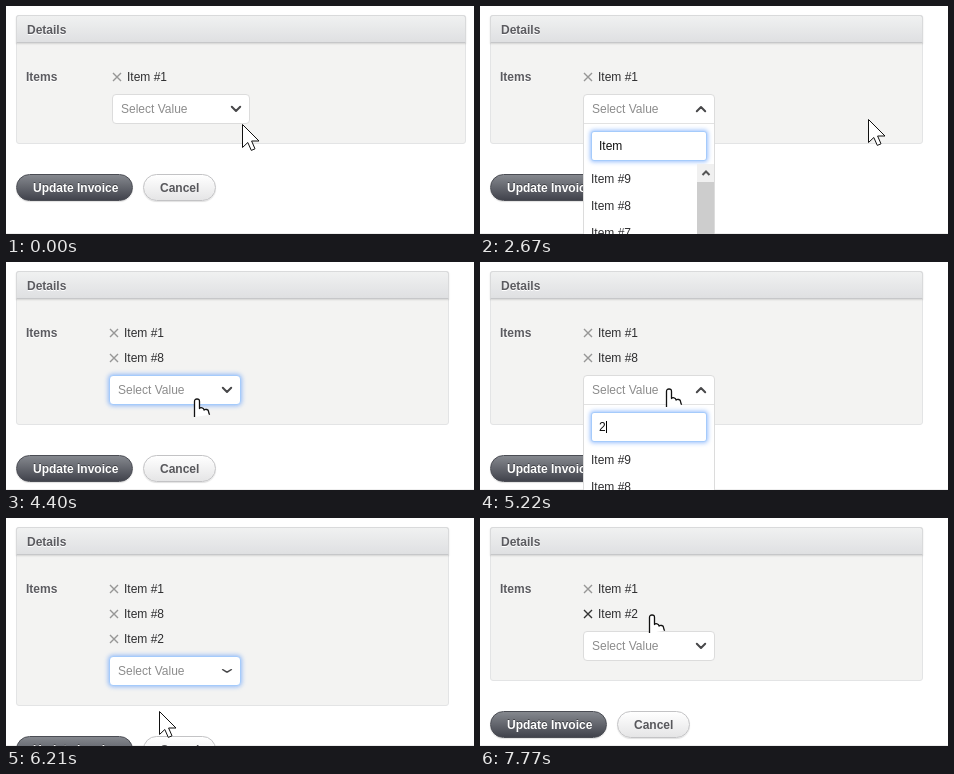
An HTML page for the animation above (7850 ms loop, 468 by 228 pixels).

```html
<!DOCTYPE html>
<html lang="en">
<head>
<meta charset="utf-8">
<title>Invoice items</title>
<style>
html, body { margin: 0; width: 100%; height: 100%; overflow: hidden; background: #fff; }
#stage {
  position: relative; width: 468px; height: 228px; overflow: hidden; background: #fff;
  font: 12px/14px "Liberation Sans", Arial, sans-serif; color: #2e2e30;
}
#stage div, #stage svg { position: absolute; box-sizing: border-box; white-space: pre; }
svg { overflow: visible; }
.rule { left: 0; top: 227px; width: 468px; height: 1px; background: #eee; }
.panel { left: 10px; top: 9px; background: #f3f3f2; border: 1px solid #e3e4e5; border-radius: 3px; }
.head {
  left: 10px; top: 9px; height: 28px; border: 1px solid #d9dadb; border-bottom-color: #c6c7c9;
  background: linear-gradient(#f0f1f1, #dfe0e2); border-radius: 3px 3px 0 0;
  box-shadow: 0 1px 2px rgba(0, 0, 0, .13);
}
.bold { font-weight: bold; color: #5b5b60; text-shadow: 0 1px #fff; }
.button {
  height: 27px; padding: 6px 0 0 16px; border: 1px solid #c3c3c5; border-radius: 14px;
  font-weight: bold; color: #58585c; background: linear-gradient(#fff, #e5e5e6);
  box-shadow: 0 1px 1px rgba(0, 0, 0, .12);
}
.dark {
  color: #fff; border-color: #4b4d54; background: linear-gradient(#85888e, #41434c);
  text-shadow: 0 -1px rgba(0, 0, 0, .4);
}
.select { background: #fff; border: 1px solid #dcdcdc; border-radius: 4px; overflow: hidden; }
.search { height: 30px; background: #fff; border: 1px solid; border-radius: 3px; }
.glow { border-color: #a5cbfb; box-shadow: 0 0 4px 1px rgba(88, 151, 251, .6); }
.divider { height: 1px; background: #e2e2e2; }
.option { height: 27px; padding: 6px 0 0 7px; }
.option.on { background: #5897fb; color: #fff; }
.caret { width: 1px; height: 12px; background: #000; }
.bar { width: 17px; height: 80px; background: #f0f0f0; }
.thumb { left: 0; top: 18px; width: 17px; height: 62px; background: #cdcdcd; }
</style>
</head>
<body>
<div id="stage"></div>
<script>
const LOOP = 7850, FRAME = 80, KEY_GAP = 90, BLINK = 500, FLIP = 200, ROW = 25, OPTION = 27;

// Each event changes part of the state
const EVENTS = [
  { at: 0, items: [1], results: [9], typing: "", open: false, wide: true, focus: false },
  { at: 410, open: true, focus: true },
  { at: 1740, typing: "Item" },
  { at: 1910, results: [9, 8, 7], wide: false },
  { at: 3900, open: false, wide: true, typing: "" },
  { at: 3980, items: [1, 8], results: [9, 8], wide: false },
  { at: 4730, open: true },
  { at: 5220, typing: "2" },
  { at: 5300, results: [2] },
  { at: 6100, items: [1, 8, 2], open: false },
  { at: 7510, items: [1, 2], focus: false }
];

const MOVES = [
  { at: 0, lasts: 0, to: [236, 118] },
  { at: 80, lasts: 240, to: [228, 97] },
  { at: 410, lasts: 170, to: [406, 106] },
  { at: 2670, lasts: 400, to: [165, 198] },
  { at: 3900, lasts: 500, to: [191, 137] },
  { at: 4570, lasts: 160, to: [189, 127] },
  { at: 5650, lasts: 400, to: [153, 193] },
  { at: 6290, lasts: 320, to: [360, 184] },
  { at: 6780, lasts: 480, to: [168, 88] },
  { at: 7590, lasts: 180, to: [172, 97] }
];

const smooth = k => k * k * (3 - 2 * k);

function stateAt(t) {
  const state = { flippedAt: -FLIP, caretAt: 0 };
  for (const event of EVENTS.filter(({ at }) => at <= t)) {
    Object.assign(state, event);
    if (event.at && "open" in event) state.flippedAt = state.caretAt = event.at;
    if (event.typing) state.typedAt = event.at;
  }
  const keys = state.typing ? Math.min(state.typing.length, 1 + Math.floor((t - state.typedAt) / KEY_GAP)) : 0;
  state.query = state.typing.slice(0, keys);
  if (keys) state.caretAt = state.typedAt + (keys - 1) * KEY_GAP;
  return state;
}

// The pointer advances once per FRAME along each eased move
function pointerAt(t) {
  const i = MOVES.findLastIndex(({ at }) => at <= t);
  const { at, lasts, to } = MOVES[i], from = i ? MOVES[i - 1].to : to;
  const step = Math.floor((t - at) / FRAME) + 1, steps = Math.floor(lasts / FRAME) + 1;
  const k = smooth(Math.min(1, step / steps));
  return to.map((end, axis) => Math.round(from[axis] + (end - from[axis]) * k));
}

const stage = document.getElementById("stage");

function add(className = "", text = "", parent = stage) {
  const el = document.createElement("div");
  el.className = className;
  el.textContent = text;
  parent.append(el);
  return el;
}

function addPath(d, attrs, parent = stage) {
  const ns = "http://www.w3.org/2000/svg";
  const svg = document.createElementNS(ns, "svg");
  const path = document.createElementNS(ns, "path");
  svg.setAttribute("width", 1);
  svg.setAttribute("height", 1);
  for (const [key, value] of Object.entries({ d, fill: "none", ...attrs })) path.setAttribute(key, value);
  svg.append(path);
  parent.append(svg);
  return svg;
}

function place(el, x, y, w, h) {
  el.style.left = x + "px";
  el.style.top = y + "px";
  if (w !== undefined) el.style.width = w + "px";
  if (h !== undefined) el.style.height = h + "px";
}

const show = (el, visible) => { el.style.display = visible ? "" : "none"; };

add("rule");
const panel = add("panel"), head = add("head");
place(add("bold", "Details"), 21, 17);
place(add("bold", "Items"), 20, 64);

const rows = [0, 1, 2].map(() => ({
  cross: addPath("M-4-4 4 4M4-4-4 4", { "stroke-width": 1.4 }),
  label: add()
}));
const update = add("button dark", "Update Invoice"), cancel = add("button", "Cancel");

const select = add("select"), selectLabel = add("", "Select Value");
selectLabel.style.color = "#8c8c8c";
const chevron = addPath("M-4.2-2.2 0 2 4.2-2.2", {
  stroke: "#48484a", "stroke-width": 2, "stroke-linecap": "round", "stroke-linejoin": "round"
});

const menu = add();
const divider = add("divider", "", menu), search = add("search glow", "", menu);
const queryText = add("", "", menu), caret = add("caret", "", menu);
const options = [0, 1, 2].map(() => add("option", "", menu));
const bar = add("bar", "", menu);
add("thumb", "", bar);
place(addPath("M-3.5 2 0-1.5 3.5 2", { stroke: "#555", "stroke-width": 2 }, bar), 8.5, 9);

const ink = { fill: "#fff", stroke: "#111", "stroke-linejoin": "round" };
const arrow = addPath("M.5.5V23.5L5.8 18.5 9.3 26.4 13 24.8 9.6 17H17Z", { ...ink, "stroke-width": 1 });
const hand = addPath(
  "M-2.5 18V2.5Q-2.5 0 0 0T2.5 2.5V9.5Q3.2 8.4 5 8.8 7 9.3 7 11 8 10 9.8 10.5 11.6 11 11.6 12.8" +
  "13 12 14.5 12.6 15.8 13.3 15.8 15.5V20Q15.8 23.5 13.5 26.5V29.7H1V27.5Q-2 25-4.5 21.5" +
  "L-7.5 17.2Q-8.6 15-7 14-5 13-2.5 16Z", { ...ink, "stroke-width": 1.3 });

function render(t) {
  const { items, results, open, wide, focus, query, flippedAt, caretAt } = stateAt(t);
  const left = wide ? 106 : 103, right = wide ? 244 : 235, width = right - left;
  const panelWidth = wide ? 450 : 433, extra = (items.length - 1) * ROW, top = 88 + extra;
  const [px, py] = pointerAt(t);

  const within = px >= left && px < right;
  const itemHover = !open && within ? Math.floor((py - 58) / ROW) : -1;
  const optionHover = open && within ? Math.floor((py - top - 72) / OPTION) : -1;
  const onSelect = within && py >= top && py < top + 30;
  const isHand = onSelect || itemHover in items || optionHover in results;

  place(panel, 10, 9, panelWidth, 129 + extra);
  place(head, 10, 9, panelWidth);
  place(update, 10, 168 + extra, 117);
  place(cancel, 137, 168 + extra, 73);

  rows.forEach(({ cross, label }, i) => {
    show(cross, i in items);
    show(label, i in items);
    place(cross, left + 4.5, 70.5 + i * ROW);
    cross.firstChild.style.stroke = i === itemHover ? "#333" : "#969696";
    place(label, left + 15, 64 + i * ROW);
    label.textContent = "Item #" + items[i];
  });

  const height = !open ? 30 : results.length > 1 ? 240 : 100;
  place(select, left, top, width, height);
  select.classList.toggle("glow", focus && !open);
  place(selectLabel, left + 9, top + 8);
  const flip = 1 - (1 - Math.min(1, (t - flippedAt) / FLIP)) ** 2;
  place(chevron, right - 14.5, top + 15);
  chevron.firstChild.setAttribute("transform", `scale(1 ${(open ? 1 - 2 * flip : 2 * flip - 1).toFixed(3)})`);

  show(menu, open);
  place(menu, left, top);
  place(divider, 1, 29, width - 2);
  place(search, 8, 37, width - 16);
  place(queryText, 16, 45);
  queryText.textContent = query || "Search";
  queryText.style.color = query ? "#111" : "#bdbdbd";
  show(caret, Math.floor((t - caretAt) / BLINK) % 2 === 0);
  place(caret, 16 + (query ? queryText.offsetWidth : 0), 46);

  const hasBar = results.length > 2;
  options.forEach((option, i) => {
    show(option, i in results);
    place(option, 1, 72 + i * OPTION, width - (hasBar ? 19 : 2));
    option.textContent = "Item #" + results[i];
    option.classList.toggle("on", i === optionHover);
  });
  show(bar, hasBar);
  place(bar, width - 18, 70);

  show(hand, isHand);
  show(arrow, !isHand);
  place(isHand ? hand : arrow, px, py);
}

const origin = performance.now();
function loop() {
  render((performance.now() - origin) % LOOP);
  requestAnimationFrame(loop);
}
loop();
</script>
</body>
</html>
```
